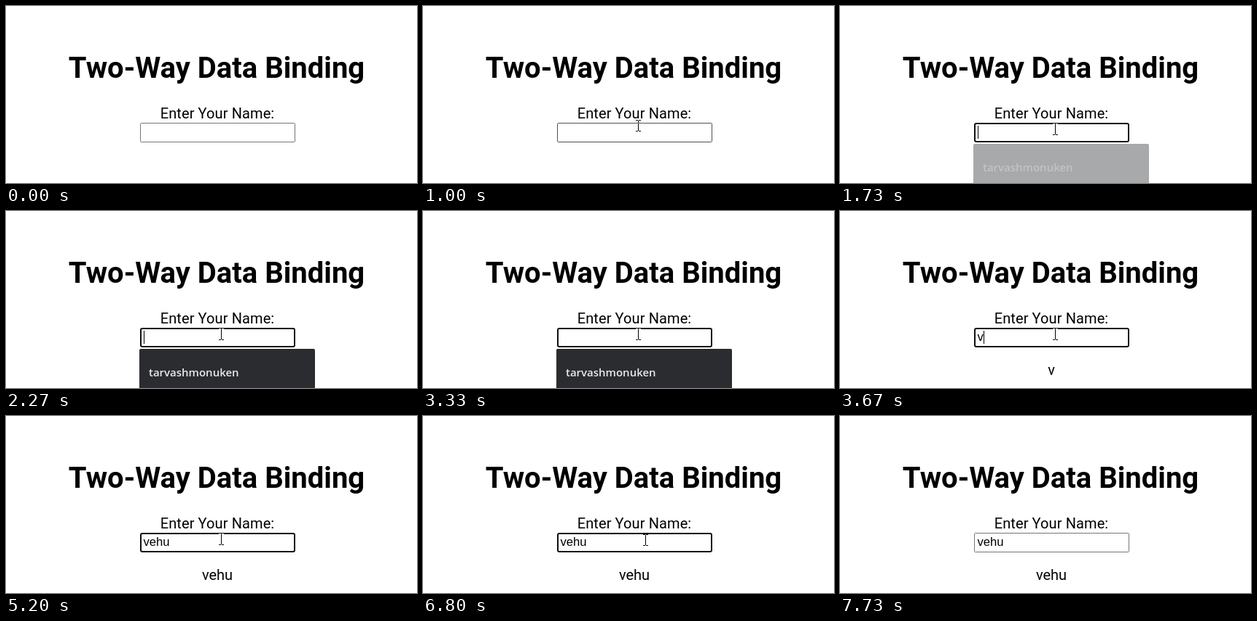
These frames come from a looping animation (564 px wide and 244 px high, 8.14 s). An HTML page with a canvas:

```html
<!DOCTYPE html>
<html lang="en">
<head>
<meta charset="utf-8">
<title>Two-Way Data Binding</title>
<style>
  html, body { margin: 0; width: 100%; height: 100%; overflow: hidden; background: #fff; }
  canvas { display: block; width: 564px; height: 244px; }
</style>
</head>
<body>
<canvas id="stage"></canvas>
<script>
const W = 564, H = 244, LOOP = 8140, TICK = 1000 / 15;
const NAME = 'vehu', SUGGESTION = 'tarvashmonuken';
const FIELD = { x: 184, y: 161, w: 213, h: 27 };
const TITLE = { x: 90, y: 66, w: 398, h: 40 };
const LABEL = { x: 212, y: 140, w: 156, h: 20 };

const KEY_TIMES = [3600, 3800, 4000, 4134];
const CARET_ON = [[1730, 2270], [2800, 3330], [3600, 4667], [5267, 5800], [6267, 6800], [7330, 7467]];
const FOCUS = [1730, 7467];
const POINTER_SHOWN = [266, 7600];

// time, x, y
const PATH = [
  [266, 440, 64], [1000, 295, 165], [1199, 295, 165], [1267, 295, 170],
  [6733, 295, 170], [7067, 387, 180], [7266, 387, 180], [7600, 440, 205]
];
// time, opacity
const MENU = [[1666, 0], [1733, 0.4], [1800, 0.85], [1867, 1], [3400, 1], [3467, 0.97], [3533, 0.9], [3600, 0.35], [3666, 0]];

const canvas = document.getElementById('stage');
const ctx = canvas.getContext('2d');
const dpr = window.devicePixelRatio || 1;
canvas.width = W * dpr;
canvas.height = H * dpr;

const within = (t, [from, to]) => t >= from && t < to;
const inside = (p, r) => p.x >= r.x && p.x < r.x + r.w && p.y >= r.y && p.y < r.y + r.h;
const smooth = k => k * k * (3 - 2 * k);

function sample(keys, t, i, ease = k => k) {
  if (t <= keys[0][0]) return keys[0][i];
  for (let n = 1; n < keys.length; n++) {
    const a = keys[n - 1], b = keys[n];
    if (t <= b[0]) return a[i] + (b[i] - a[i]) * ease((t - a[0]) / (b[0] - a[0]));
  }
  return keys[keys.length - 1][i];
}

function text(str, x, y, font, { align = 'left', color = '#000', spacing = 0 } = {}) {
  ctx.font = font;
  ctx.textAlign = align;
  ctx.fillStyle = color;
  ctx.letterSpacing = spacing + 'px';
  ctx.fillText(str, x, y);
}

function outline(inset, radius, width, color) {
  ctx.beginPath();
  ctx.roundRect(FIELD.x + inset, FIELD.y + inset, FIELD.w - 2 * inset, FIELD.h - 2 * inset, radius);
  ctx.lineWidth = width;
  ctx.strokeStyle = color;
  ctx.stroke();
}

function drawField(t, typed, pointer) {
  if (within(t, FOCUS)) outline(1, 2, 2, '#101010');
  else outline(0.5, 1, 1, pointer && inside(pointer, FIELD) ? '#4f4f4f' : '#767676');

  const font = '16.67px "Liberation Sans", Arial, sans-serif';
  text(typed, 188.5, 179, font);
  if (CARET_ON.some(span => within(t, span))) {
    ctx.font = font;
    const x = Math.round(188.8 + ctx.measureText(typed).width);
    ctx.fillRect(x, 165, 1, 18);
  }
}

function drawMenu(t) {
  const alpha = sample(MENU, t, 1);
  if (alpha <= 0) return;
  const shift = t > 3500 ? 0.8 : 0;
  ctx.save();
  ctx.globalAlpha = alpha;
  ctx.translate(shift, shift);
  ctx.fillStyle = '#2b2c30';
  ctx.beginPath();
  ctx.roundRect(183, 190, 241, 80, 2);
  ctx.fill();
  text(SUGGESTION, 196, 227.5, '600 15px "Open Sans", "Noto Sans", sans-serif', { color: '#e8eaed' });
  ctx.restore();
}

function drawBeam({ x, y }) {
  ctx.save();
  ctx.globalCompositeOperation = 'difference';
  ctx.fillStyle = '#fff';
  ctx.fillRect(x, y - 7, 1, 14);
  for (const row of [y - 8, y + 7]) {
    ctx.fillRect(x - 3, row, 3, 1);
    ctx.fillRect(x + 1, row, 3, 1);
  }
  ctx.restore();
}

function drawArrow({ x, y }) {
  ctx.beginPath();
  [[0, 0], [0, 16], [4, 12.5], [6.5, 18], [9, 17], [6.5, 11.5], [11.5, 11.5]]
    .forEach(([dx, dy]) => ctx.lineTo(x + dx + 0.5, y + dy + 0.5));
  ctx.closePath();
  ctx.fillStyle = '#fff';
  ctx.fill();
  ctx.lineWidth = 1;
  ctx.strokeStyle = '#000';
  ctx.stroke();
}

function draw(time) {
  // Screen updates arrive fifteen times a second.
  const t = Math.floor((time + 4) / TICK) * TICK + 1;
  const typed = NAME.slice(0, KEY_TIMES.filter(k => t >= k).length);
  const pointer = within(t, POINTER_SHOWN) && {
    x: Math.round(sample(PATH, t, 1, smooth)),
    y: Math.round(sample(PATH, t, 2, smooth))
  };

  ctx.setTransform(dpr, 0, 0, dpr, 0, 0);
  ctx.fillStyle = '#fff';
  ctx.fillRect(0, 0, W, H);

  const body = '20px Roboto, sans-serif';
  text('Two-Way Data Binding', 289, 99, 'bold 40px Roboto, sans-serif', { align: 'center' });
  text('Enter Your Name:', 290, 155, body, { align: 'center', spacing: 0.1 });
  text(typed, 290, 226, body, { align: 'center' });
  drawField(t, typed, pointer);
  drawMenu(t);

  if (pointer) {
    const overText = [TITLE, LABEL, FIELD].some(r => inside(pointer, r));
    (overText && t < 7000 ? drawBeam : drawArrow)(pointer);
  }
}

function loop() {
  draw(performance.now() % LOOP);
  requestAnimationFrame(loop);
}
loop();
</script>
</body>
</html>
```
